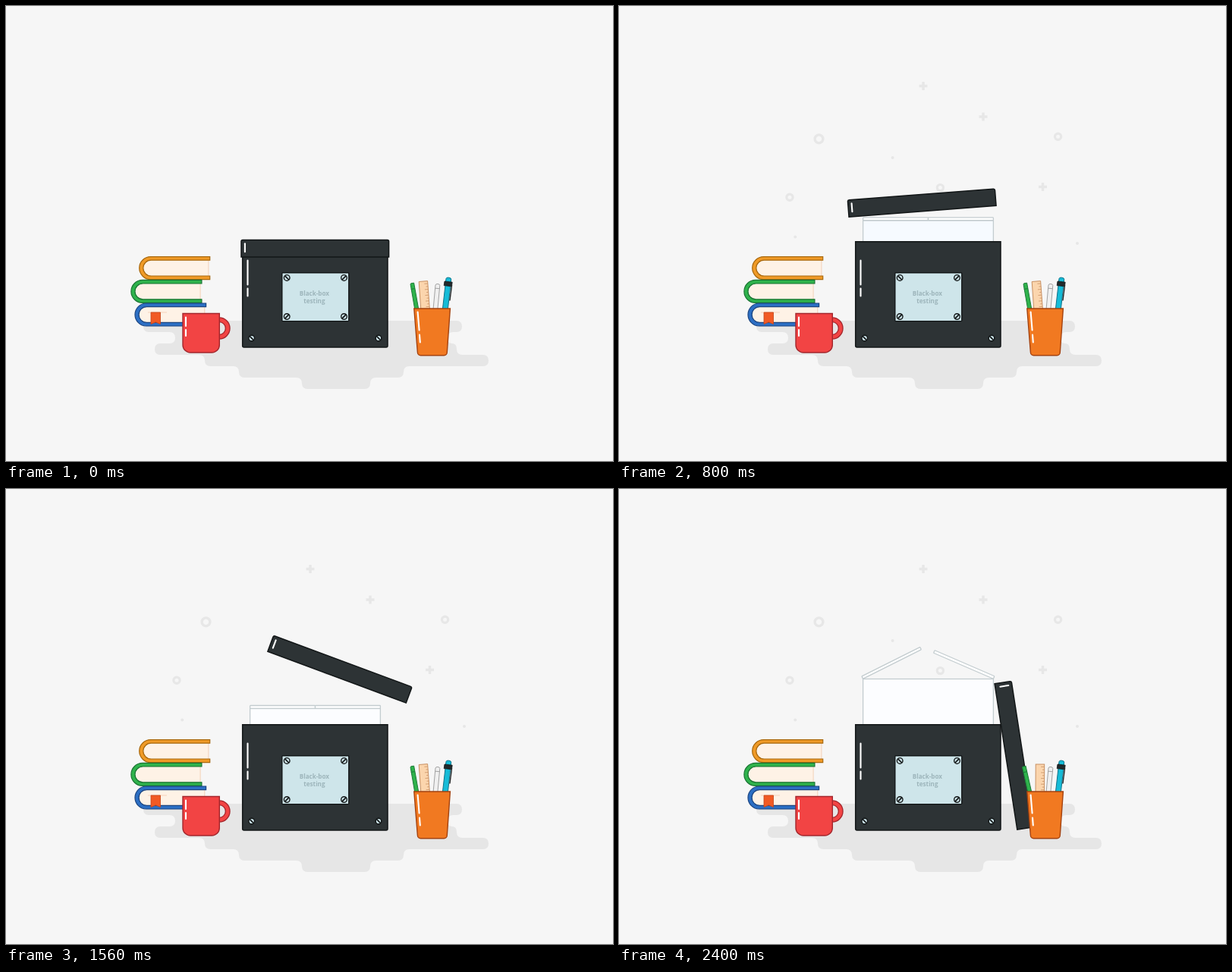
An HTML page that plays this animation: 800x600 px, repeating every 2.88 s.

```html
<!DOCTYPE html>
<html lang="en">
<head>
<meta charset="utf-8">
<title>Black-box testing</title>
<style>
  html, body { margin: 0; width: 100%; height: 100%; overflow: hidden; background: #f6f6f6; }
  svg { display: block; width: 100vw; height: 100vh; }
  .dark { fill: #2d3335; stroke: #121617; stroke-width: 1.5; }
  .shine { fill: none; stroke: #fff; stroke-width: 2.1; stroke-linecap: round; }
  .plate { fill: #cee5ea; stroke: #121617; stroke-width: 1.4; }
  .label { font: 700 8.1px "Open Sans", sans-serif; fill: #9db5bb; text-anchor: middle; }
  .mug { fill: #f24444; stroke: #a3262c; stroke-width: 1.4; }
  .carton { stroke: #c3cccf; stroke-width: 1.3; }
</style>
</head>
<body>
<svg viewBox="0 0 800 600">
  <path id="ground" fill="#e6e6e6"/>
  <g id="sparks" fill="none" stroke="#e7e7e7"></g>
  <g id="books"></g>
  <g>
    <path d="M187 404h25" stroke="#f6d3bb"/>
    <path d="M191 404h12.5v15.5l-6.2-2.6-6.3 2.6z" fill="#f15a24" stroke="#c2441a" stroke-width=".8"/>
  </g>
  <circle cx="281" cy="425" r="11.2" fill="none" stroke="#a3262c" stroke-width="7"/>
  <circle cx="281" cy="425" r="11.2" fill="none" stroke="#f24444" stroke-width="4.4"/>
  <path class="mug" d="M233 405.5h48.3v41.5a10 10 0 0 1-10 10h-28.3a10 10 0 0 1-10-10z"/>
  <path class="shine" d="M237 410.5v11.5M237 427v8"/>

  <g id="carton">
    <rect id="sheet" class="carton" x="321.6" y="4" width="171.8" height="90"/>
    <rect id="flapL" class="carton" fill="#fff" x="321.6" y="0" width="85.9" height="3.8" rx=".8"/>
    <rect id="flapR" class="carton" fill="#fff" x="407.5" y="0" width="85.9" height="3.8" rx=".8"/>
  </g>
  <path class="dark" d="M311.7 310.8h191.3v137.2a2 2 0 0 1-2 2h-187.3a2 2 0 0 1-2-2z"/>
  <path class="shine" d="M318.5 335.5v32M318.5 372.5v10"/>
  <rect class="plate" x="363.8" y="351.8" width="88" height="63.8" rx="1"/>
  <text class="label" x="406.4" y="382">Black-box</text>
  <text class="label" x="406.4" y="391.6">testing</text>
  <g id="screws"></g>
  <g id="lid">
    <path class="dark" d="M-97.3 11.2v-20.4a2 2 0 0 1 2-2h190.6a2 2 0 0 1 2 2v20.4z"/>
    <path class="shine" d="M-92.4-6.5v11"/>
  </g>

  <g id="marker" stroke="#1b7a36">
    <path d="M533 366.6q0-1.2 4.6-1.4l6.4 36h-5z" fill="#2fb34c"/>
    <path d="M533.8 373.4l5-.8"/>
  </g>
  <g id="ruler" stroke="#c89062">
    <path d="M544.2 363.5l11.4-.9 3 40h-11.6z" fill="#fbd5ad"/>
    <path id="ticks" stroke-width=".8"/>
  </g>
  <path d="M566 368q.3-1.7 3-1.5t2.8 2l-3.2 34h-5.8zM565.7 372.2l5.6.5" fill="#f0f0f0" stroke="#a2a2a2"/>
  <path d="M580 359.5q.3-1.8 3.5-1.4t3.2 2.2l-4.6 42h-7z" fill="#16bcd8" stroke="#117188"/>
  <path d="M578 363l10.2 1.2-.8 5.6-10.2-1.2z" fill="#22292b" stroke="#121617" stroke-width=".8"/>
  <path d="M587.5 368l-2.6 20.5" stroke="#22292b" stroke-width="1.5"/>
  <path d="M537.8 399h47.6l-4.1 57.7a4 4 0 0 1-4 4h-30.9a4 4 0 0 1-4-4z" fill="#f17921" stroke="#a4420f" stroke-width="1.4"/>
  <path class="shine" d="M542.6 403.5l2 24M545 433.5l.8 10"/>
</svg>
<script>
const $ = id => document.getElementById(id);
const NS = "http://www.w3.org/2000/svg";
const LOOP = 2880, STEP = 40, LAST = 2400;

function add(parent, tag, attrs) {
  const el = document.createElementNS(NS, tag);
  for (const k in attrs) el.setAttribute(k, attrs[k]);
  parent.appendChild(el);
  return el;
}

// Closed polygon with every corner rounded by a quarter arc
function rounded(pts, r) {
  const n = pts.length;
  const toward = (a, b) => {
    const d = Math.hypot(b[0] - a[0], b[1] - a[1]), k = Math.min(r, d / 2) / d;
    return [a[0] + (b[0] - a[0]) * k, a[1] + (b[1] - a[1]) * k];
  };
  return pts.map((p, i) => {
    const a = toward(p, pts[(i + n - 1) % n]), b = toward(p, pts[(i + 1) % n]);
    return (i ? "L" : "M") + a + "Q" + p + " " + b;
  }).join("") + "Z";
}

$("ground").setAttribute("d", rounded([
  [181, 415], [601, 415], [601, 430], [582, 430], [582, 445], [594, 445], [594, 460], [636, 460],
  [636, 475], [524, 475], [524, 490], [480, 490], [480, 505], [390, 505], [390, 490], [307, 490],
  [307, 475], [262, 475], [262, 460], [196, 460], [196, 445], [223, 445], [223, 430], [181, 430]
], 7.5));

function book(x, y, w, fill, line) {
  const g = $("books"), end = x + w;
  add(g, "path", { d: `M${end - 1.8} ${y + 3}H${x + 15}a12 12 0 0 0 0 24H${end - 1.8}z`, fill: "#fef2e6", stroke: "#f3d2b8" });
  add(g, "path", {
    d: `M${end} ${y}H${x + 15}a15 15 0 0 0 0 30H${end}v-4.6H${x + 15.5}a10.4 10.4 0 0 1 0-20.8H${end}z`,
    fill, stroke: line, "stroke-width": 1.2
  });
}
book(175.7, 330.6, 93, "#f09a26", "#a8690f");
book(164.9, 361.4, 93, "#2fb34c", "#1a7433");
book(170, 392, 93.6, "#2c6fc4", "#1b4480");

function screw(x, y, dir) {
  const g = $("screws");
  add(g, "circle", { cx: x, cy: y, r: 3.8, class: "plate" });
  add(g, "path", { d: `M${x - 2.6} ${y - 2.6 * dir}l5.2 ${5.2 * dir}`, stroke: "#121617", "stroke-width": 1.7 });
}
screw(370.2, 358.4, 1);
screw(445.5, 358.4, -1);
screw(370.2, 409.5, -1);
screw(445.5, 409.5, -1);
screw(323.7, 438, 1);
screw(491, 438, 1);

let ticks = "";
for (let i = 0; i < 9; i++) {
  const w = i % 2 ? 2.6 : 4.4;
  ticks += `M${555.8 + i * .28} ${366 + i * 3.8}l${-w} .3`;
}
$("ticks").setAttribute("d", ticks);

// kind, resting x, resting y, flight time
const sparks = [
  ["plus", 401, 105.5, 460], ["plus", 480, 146, 495], ["plus", 558.5, 238.5, 545],
  ["ring", 263.5, 175.3, 495, 5.4], ["ring", 578.6, 172.2, 510, 4.1],
  ["ring", 423.4, 239.6, 560, 4.1], ["ring", 225, 252.2, 570, 4.1],
  ["dot", 360.6, 200, 480], ["dot", 232.3, 304.5, 490], ["dot", 604, 313, 510]
].map(([kind, x, y, time, r]) => {
  const g = $("sparks");
  const el = kind === "plus" ? add(g, "path", { d: "M-5.5 0h11M0-5.5v11", "stroke-width": 3.4 })
    : kind === "ring" ? add(g, "circle", { r, "stroke-width": r > 5 ? 3.4 : 3.2 })
    : add(g, "circle", { r: 2, fill: "#e7e7e7", stroke: "none" });
  return { el, x, y, time };
});

const clamp = v => Math.max(0, Math.min(1, v));
const ease = (t, a, b) => { const u = clamp((t - a) / (b - a)); return u * u * (3 - 2 * u); };
const hop = (t, a, b) => { const u = (t - a) / (b - a); return u > 0 && u < 1 ? 4 * u * (1 - u) : 0; };

// Smooth curve through [time, value] keys
function curve(keys) {
  const slope = i => {
    if (!i || i === keys.length - 1) return 0;
    const [a, c] = [keys[i - 1], keys[i + 1]];
    return (c[1] - a[1]) / (c[0] - a[0]);
  };
  return t => {
    const j = keys.findIndex(k => k[0] > t);
    if (j < 0) return keys[keys.length - 1][1];
    const [t0, a] = keys[j - 1], [t1, b] = keys[j];
    const d = t1 - t0, u = (t - t0) / d, v = 1 - u;
    return v * v * ((1 + 2 * u) * a + u * d * slope(j - 1)) + u * u * ((3 - 2 * u) * b - v * d * slope(j));
  };
}

const lidX = curve([[0, 407.3], [400, 407.3], [570, 406], [800, 399.2], [1050, 395.8], [1280, 401.7],
  [1400, 411], [1560, 440], [1880, 494.5], [2010, 514], [2110, 520], [2240, 520.6], [2360, 521]]);
const lidTurn = curve([[0, 0], [200, 3.6], [400, 5.2], [570, 0], [800, -4.4], [1000, -5], [1280, -.4],
  [1390, 2], [1560, 20.4], [1880, 60.6], [2110, 84], [2240, 82], [2360, 81.2]]);

function lidY(t) {
  if (t < 1411) return 319.7 - 45.2 * hop(t, 0, 570) - 74.4 * hop(t, 570, 1390);
  return Math.min(351.3, 203 + .00107 * (t - 1740) ** 2);
}

const cartonY = t => 312 - 7.7 * hop(t, 0, 570) - 41 * hop(t, 570, 1390) - 65.5 * ease(t, 1390, 1780);

function draw(t) {
  const move = (id, value) => $(id).setAttribute("transform", value);
  move("lid", `translate(${lidX(t)} ${lidY(t)}) rotate(${lidTurn(t)})`);

  move("carton", `translate(0 ${cartonY(t)})`);
  const tone = ease(t, 1280, 1560);
  $("sheet").setAttribute("fill", `rgb(${246 + 6 * tone},${250 + 3 * tone},255)`);
  const open = ease(t, 1980, 2440) / ease(LAST, 1980, 2440);
  move("flapL", `rotate(${-26.6 * open} 321.6 3.8)`);
  move("flapR", `rotate(${23.4 * open} 493.4 3.8)`);

  const nudge = ease(t, 2080, 2240);
  move("ruler", `translate(${2.2 * nudge} 0) rotate(${4.4 * nudge} 552 400)`);
  move("marker", `rotate(${-2.6 * nudge} 541 400)`);

  for (const s of sparks) {
    const left = (1 - clamp((t - 40) / (s.time + 0))) ** 3;
    const x = s.x + (407 - s.x) * left, y = s.y + (345 - s.y) * left;
    s.el.setAttribute("transform", `translate(${x} ${y}) rotate(${left * 540})`);
    s.el.setAttribute("opacity", t < 80 ? 0 : 1 - .3 * clamp(left * 20));
  }
}

const start = performance.now();
function tick() {
  const t = (performance.now() - start) % LOOP;
  draw(Math.min(LAST, Math.floor(t / STEP) * STEP));
  requestAnimationFrame(tick);
}
draw(0);
requestAnimationFrame(tick);
</script>
</body>
</html>
```
